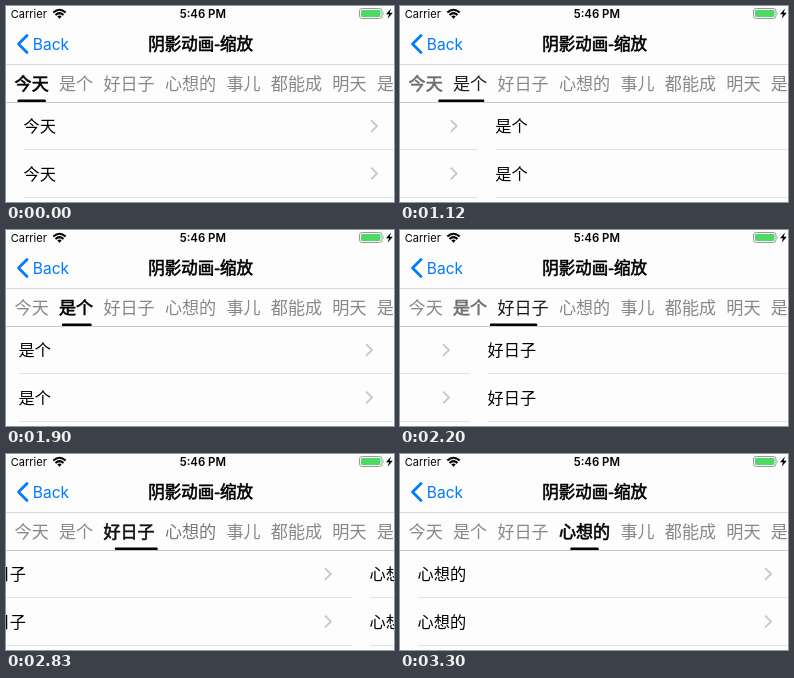
Write an HTML page that moves like this. It is 388x196 px and loops after 4.38 s.

```html
<!DOCTYPE html>
<html lang="zh-CN">
<head>
<meta charset="utf-8">
<style>
html, body { margin: 0; width: 100%; height: 100%; overflow: hidden; background: #fdfdfd; }
svg { display: block; width: 388px; height: 196px; }
text { font-family: "Noto Sans CJK SC", "Noto Sans CJK", sans-serif; }
.latin { font-family: Inter, Roboto, sans-serif; }
.line { fill: none; stroke-linecap: round; stroke-linejoin: round; }
/* a weight between regular and bold */
.medium { stroke: currentColor; stroke-width: 0.6px; }
</style>
</head>
<body>
<svg viewBox="0 0 388 196">
  <text class="latin" x="4.8" y="12" font-size="11">Carrier</text>
  <g class="line" stroke="#000" stroke-width="2" style="stroke-linecap:butt">
    <path d="M47.3 6.6Q53.5 0.9 59.7 6.6"/>
    <path d="M49.5 9Q53.5 5.3 57.5 9"/>
  </g>
  <path d="M51.3 10.4Q53.5 8.6 55.7 10.4L53.5 12.7Z"/>
  <text class="latin" x="196.8" y="12" font-size="11.4" font-weight="600" text-anchor="middle">5:46 PM</text>
  <rect x="353.5" y="2.5" width="22.5" height="10" rx="2.6" fill="none" stroke="#999"/>
  <rect x="355" y="4" width="19.5" height="7" rx="1.3" fill="#4cd964"/>
  <path d="M377 5.8Q378.6 7.5 377 9.2Z" fill="#999"/>
  <path d="M385 2.5L380 8.2H383L381.6 12.8L386.8 6.7H383.7Z"/>
  <path class="line" d="M21 29.5L12.5 38L21 46.5" stroke="#007aff" stroke-width="2.8"/>
  <text class="latin" x="26.8" y="43.5" font-size="15.5" fill="#007aff">Back</text>
  <text class="medium" x="194.6" y="44" font-size="16.5" text-anchor="middle">阴影动画-缩放</text>
  <rect y="58" width="388" height="1" fill="#d8d8d8"/>
  <g id="tabs" font-size="17.1"></g>
  <rect y="96" width="388" height="1" fill="#c8c8c8"/>
  <rect id="bar" y="93.6" height="2.5" rx="1.2"/>
  <g id="pages" font-size="16.2"></g>
</svg>
<script>
const LOOP = 4380, PAGE = 392, STEP = 56.6, BAR = 28.5, GRAY = 136;
const labels = ['今天', '是个', '好日子', '心想的', '事儿', '都能成', '明天', '是'];
// start: first visible movement; lead: steps of the drag already done by then
const swipes = [
  { start: 830, lead: 0.08 },
  { start: 1900, lead: 0.24 },
  { start: 2830, lead: 1.08 }
];
const $ = id => document.getElementById(id);

function add(parent, tag, attrs, text = '') {
  const el = document.createElementNS('http://www.w3.org/2000/svg', tag);
  for (const key in attrs) el.setAttribute(key, attrs[key]);
  el.textContent = text;
  return parent.appendChild(el);
}

let nextX = 8.6;
const tabs = labels.map(label => {
  const width = label.length * 17.1;
  const tab = { el: add($('tabs'), 'text', { x: nextX, y: 84 }, label), mid: nextX + width / 2 };
  nextX += width + 10.2;
  return tab;
});

labels.slice(0, 4).forEach((label, i) => {
  const page = add($('pages'), 'g', { transform: `translate(${i * PAGE})` });
  for (const y of [120, 167.5]) {
    add(page, 'text', { x: 17.6, y: y + 6 }, label);
    add(page, 'path', { class: 'line', d: `M365.6 ${y - 5.3}l5.4 5.3l-5.4 5.3`, stroke: '#c7c7cc', 'stroke-width': 1.8 });
    add(page, 'rect', { x: 18, y: Math.ceil(y + 23), width: PAGE - 18, height: 1, fill: '#e2e2e4' });
  }
});

function swipeAt(t, { start, lead }) {
  if (t < start) return 0;
  const u = Math.min(1, (Math.floor((t - start) / STEP) + lead) / 9.1);
  const p = 1 - (1 - u ** 1.5) ** 3;
  return p > 0.999 ? 1 : p;
}

function draw(now) {
  const t = now % LOOP;
  const scroll = swipes.reduce((sum, swipe) => sum + swipeAt(t, swipe), 0);
  const index = Math.floor(scroll), p = scroll - index;

  tabs.forEach(({ el }, i) => {
    const shade = Math.round(GRAY * Math.min(1, Math.abs(scroll - i)));
    el.style.color = el.style.fill = `rgb(${shade},${shade},${shade})`;
    el.classList.toggle('medium', i === index);
  });

  // the right end leads in the first half, the left end follows in the second
  const from = tabs[index].mid, gap = tabs[index + 1].mid - from;
  const left = from + gap * Math.max(0, 2 * p - 1) - BAR / 2;
  const right = from + gap * Math.min(1, 2 * p) + BAR / 2;
  $('bar').setAttribute('x', left);
  $('bar').setAttribute('width', right - left);
  $('pages').setAttribute('transform', `translate(${-scroll * PAGE})`);
}

const begin = performance.now();
function tick() {
  draw(performance.now() - begin);
  requestAnimationFrame(tick);
}
tick();
</script>
</body>
</html>
```
